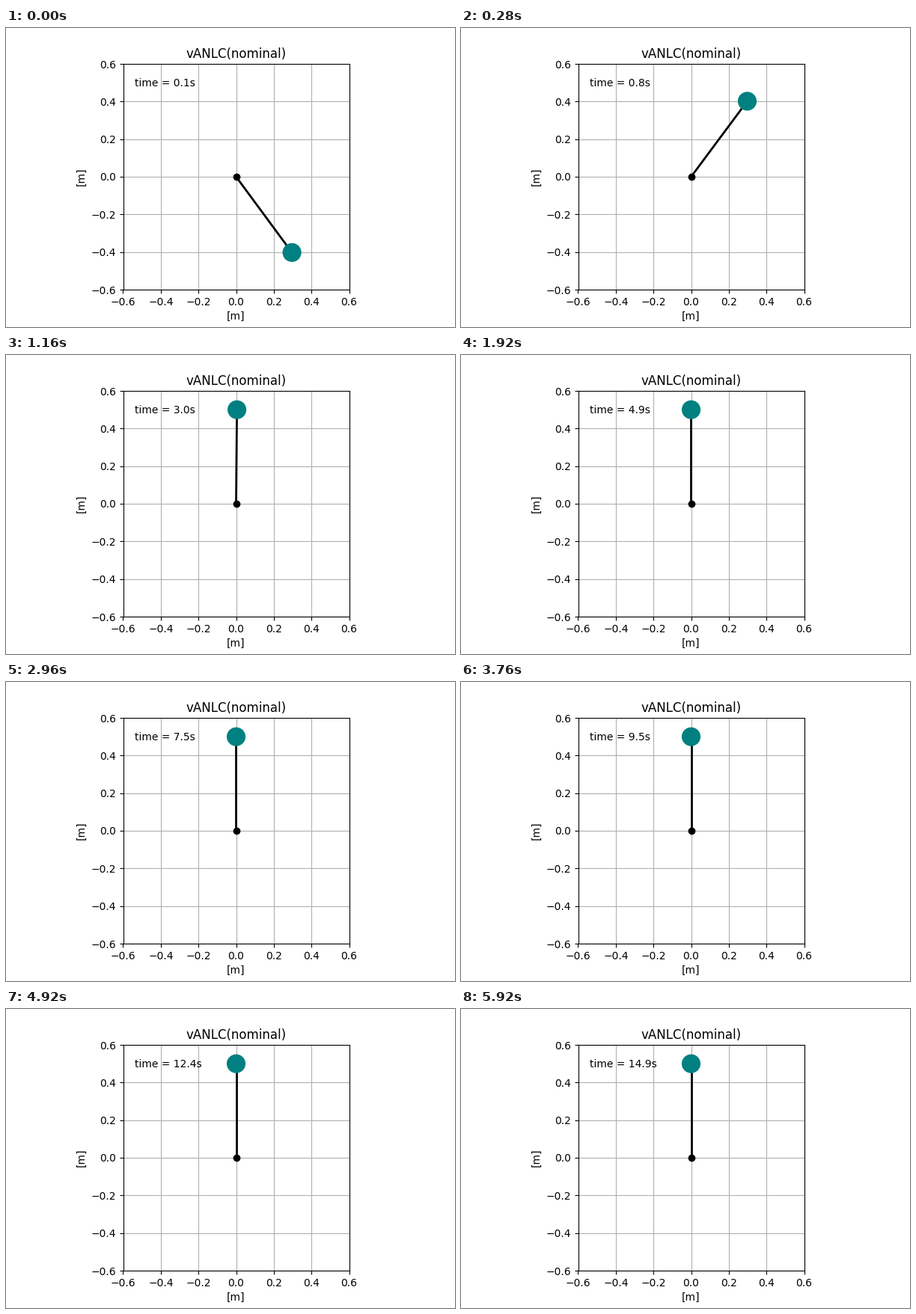
Animation of 600 by 400 pixels, one loop 5960 ms. Source, as a matplotlib script:

```python
import numpy as np
import matplotlib.pyplot as plt
from matplotlib.animation import FuncAnimation

STEPS = 149
DT = 0.1
LENGTH = 0.5
TRAIL = 10

# Angle from upright: starts hanging down, then decays geometrically.
k = np.arange(STEPS + 1)
theta = 2.507 * 0.8225 ** (k - 1.0)
theta[0] = np.pi
xs = LENGTH * np.sin(theta)
ys = LENGTH * np.cos(theta)

fig = plt.figure(figsize=(6, 4), dpi=100)
fig.subplots_adjust(left=0.125, right=0.9, bottom=0.125, top=0.88)
ax = fig.add_subplot(111, aspect="equal", xlim=(-0.6, 0.6), ylim=(-0.6, 0.6))
ax.set_title("vANLC(nominal)")
ax.set_xlabel("[m]")
ax.set_ylabel("[m]")
ax.grid()

rod, = ax.plot([], [], "o-", color="black", lw=2)
trail, = ax.plot([], [], ".-", color="seagreen", lw=1, ms=3, alpha=0.7)
bob = plt.Circle((0, 0), 0.05, fc="teal", zorder=10)
ax.add_patch(bob)
clock = ax.text(0.05, 0.9, "", transform=ax.transAxes)


def update(frame):
    i = frame + 1
    # The trail appears once a full window of positions exists.
    window = slice(i - TRAIL, i) if i >= TRAIL else slice(0, 0)
    rod.set_data([0, xs[i]], [0, ys[i]])
    trail.set_data(xs[window], ys[window])
    bob.center = xs[i], ys[i]
    clock.set_text(f"time = {i * DT:.1f}s")
    return rod, trail, bob, clock


anim = FuncAnimation(fig, update, frames=STEPS, interval=40, repeat=True,
                     repeat_delay=0)
plt.show()
```
